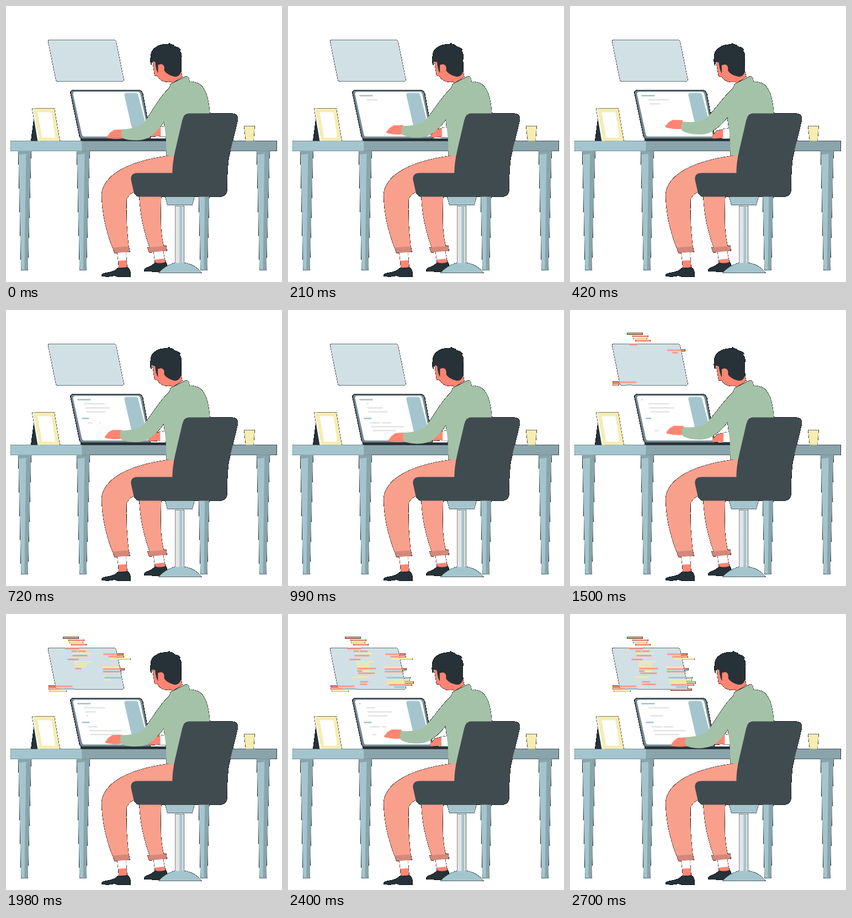
An HTML page for the animation above (2730 ms loop, 500 by 500 pixels).

```html
<!DOCTYPE html>
<html lang="en">
<head>
<meta charset="utf-8">
<title>Working at a desk</title>
<style>
html, body { margin: 0; width: 100%; height: 100%; overflow: hidden; background: #fff; }
svg { display: block; width: 100vw; height: 100vh; }
.blue { fill: #a4c5cd; } .steel { fill: #8aa4ab; } .dark { fill: #263238; }
.chair { fill: #404b50; } .skin { fill: #ff8573; } .pants { fill: #f9a08d; }
.cuff { fill: #d5877a; } .shirt { fill: #a4c2a8; } .cream { fill: #f5edb1; } .white { fill: #fff; }
</style>
</head>
<body>
<svg viewBox="0 0 500 500">
<defs>
  <!-- Blends the soft edge pixels with black, which leaves a fine dark rim -->
  <filter id="rim" filterUnits="userSpaceOnUse" x="0" y="0" width="500" height="500" color-interpolation-filters="sRGB">
    <feComponentTransfer in="SourceAlpha" result="mask"><feFuncA type="linear" slope="20"/></feComponentTransfer>
    <feMerge><feMergeNode in="mask"/><feMergeNode in="SourceGraphic"/></feMerge>
  </filter>
  <g id="leg">
    <path class="blue" d="M0 262H23L17 478H5Z"/>
    <path class="steel" d="M0 262H23L17 478H11L14 267L1 269Z"/>
  </g>
</defs>
<g filter="url(#rim)"><g transform="translate(.4 .4)">
  <path fill="#d1e0e5" d="M79 61H195Q198 61 199 64L213 133Q213 136 210 136H94Q91 136 90 133L76 64Q76 61 79 61Z"/>
  <g id="code"></g>

  <use href="#leg" x="22"/><use href="#leg" x="128"/>
  <use href="#leg" x="347"/><use href="#leg" x="454"/>
  <path class="steel" d="M8 244H490V262H8Z"/>
  <path class="blue" d="M8 244H137V262H8Z"/>

  <path class="dark" d="M52 190L45 244H58Z"/>
  <path class="white" d="M47 185H52L61 244H57Z"/>
  <path class="cream" d="M49 185H87L97 244H60Z"/>
  <path class="white" d="M57 192H82L89 238H65Z"/>
  <path class="cream" d="M431 217H450L448 244H434Z"/>

  <path fill="#72888f" stroke="#263238" stroke-width=".8" d="M121 152.5H240Q245 152.5 247 158L261 235Q262 240 258 240H139Q134 240 133 235L117 158Q116 152.5 121 152.5Z"/>
  <path class="white" d="M125 155H238Q242 155 243 159L258 232Q258 236 255 236H141Q138 236 137 232L121 159Q121 155 125 155Z"/>
  <path class="blue" d="M217 157H235Q238 157 239 161L255 222H231Q228 222 227 218L214 161Q214 157 217 157Z"/>
  <g id="page"></g>
  <path class="dark" d="M135 239.5H290V244H137Q134 244 135 239.5Z"/>

  <path class="pants" d="M241 340C242 380 251 412 260 438L286 437C279 410 279 380 281 340Z"/>
  <path class="white" d="M267 444L284 442L287 458L269 460Z"/>
  <path class="cuff" d="M256 437L290 434L291 443L259 446Z"/>
  <path class="skin" d="M269 459L287 457L289 466L270 468Z"/>
  <path class="dark" d="M250 480Q249 475 256 473Q265 470 270 464Q280 467 289 463Q293 470 290 477L276 481Z"/>

  <path class="blue" d="M288 345H341L337 360H292Z"/>
  <path fill="#e2e4e3" d="M306 362H322V467H306Z"/>
  <path class="blue" d="M314 362H319V467H314ZM276 483Q288 470 305 465H325Q343 469 354 483Z"/>

  <g id="farHand">
    <path class="white" d="M278 219L292 217V236H278Z"/>
    <path class="skin" d="M280 219L268 222L259 233L262 236L280 235Z"/>
  </g>
  <path class="shirt" d="M298 141L326 127Q331 126 332 137C357 136 366 155 369 195L340 271H290C291 240 287 222 285 203L290 160Z"/>
  <g id="head">
    <path class="skin" d="M265 98L267 112L269 126L274 126Q280 137 293 137H300L301 139L319 128L314 105L290 90Z"/>
    <path class="dark" d="M263 106Q260 101 262 91Q262 80 270 75Q279 68 293 69Q297 65 297 69Q304 69 305 73Q313 74 316 79Q313 80 315 82Q319 87 317 97V118Q313 130 303 127Q291 124 286 116L280 105L275 106V121Q271 115 270 101L264 99Z"/>
    <path class="skin" d="M276 112Q276 104 282 105Q288 107 286 117Q280 120 277 116Z"/>
  </g>
  <path class="pants" d="M304 270C250 275 177 295 173 341C173 375 182 410 193 438L222 437C218 400 217 372 218 350Q223 337 240 334L304 340Z"/>
  <path class="white" d="M201 445L217 444L218 461L203 462Z"/>
  <path class="cuff" d="M193 437L222 435L224 445L196 447Z"/>
  <path class="skin" d="M203 461L218 460L219 473L204 474Z"/>
  <path class="dark" d="M173 489Q172 484 181 483Q197 481 204 473Q211 476 219 472Q227 478 225 490H202L196 488Q188 491 173 489Z"/>
  <path class="chair" d="M331 194H408Q422 195 419 208L403 275Q400 300 400 333Q399 345 387 345H243Q234 345 231 336L226 314Q225 302 238 302H301Q301 283 306 262L319 206Q322 194 331 194Z"/>
  <path id="hand" class="skin" d="M213 223L195 224L188 229L182 237L184 239L193 240Q203 241 213 239Z"/>
  <path id="arm" class="shirt"/>
</g></g>
</svg>
<script>
const LOOP = 2730, SWING = 910;
const RED = '#f79c87', YELLOW = '#f3eaa5', BLUE = '#a4c3cc', GREY = '#e3e5e3';
const $ = id => document.getElementById(id);
const clamp = v => Math.max(0, Math.min(1, v));

function addBar(parent, x, y, height, fill) {
  const bar = document.createElementNS('http://www.w3.org/2000/svg', 'rect');
  for (const [k, v] of Object.entries({ x, y: y - height / 2, height, fill })) bar.setAttribute(k, v);
  return $(parent).appendChild(bar);
}

// x, y, width, colour, then times at which the line starts typing or erasing
const page = [
  [129, 162, 24, BLUE, 30, 1360, 1520, 2262, 2420],
  [141, 169.5, 38, GREY, 130, 860, 1050, 2316, 2470],
  [143, 177, 45, GREY, 357, 936, 1170, 1893, 2100, 2480],
  [145, 184, 35, GREY, 480, 1040, 1280, 1843, 2150, 2649],
  [137, 196, 14, BLUE, 580, 1150, 1395],
  [148, 204, 18, GREY, 650, 1200, 1700],
  [169, 204, 18, GREY, 700, 1250, 2325],
  [150, 211, 59, GREY, 780, 1300, 1750, 2150, 2450],
  [153, 218, 53, GREY, 871, 1372, 1750, 2270, 2575]
].map(([x, y, w, color, ...flips]) => ({ w, flips, el: addBar('page', x, y, 2.6, color) }));

// Each block types downwards: start time, ms per pixel of height, lines
const code = [
  [1165, 14, [
    [103, 42.5, 28, RED], [113, 47, 28, RED], [114, 51, 25, YELLOW], [118, 55, 27, RED],
    [107, 62.5, 25, RED], [118, 67, 10, RED], [130, 67, 14, RED], [120, 71, 32, YELLOW],
    [120, 75, 27, RED], [111, 82, 20, RED], [123, 86, 33, YELLOW], [123, 90, 25, YELLOW],
    [125, 94.5, 22, YELLOW], [125, 98.5, 34, RED], [125, 103, 9, RED], [136, 103, 12, YELLOW],
    [127, 107, 30, RED], [117, 114, 26, YELLOW], [130, 122.5, 15, RED], [130, 127, 25, RED]]],
  [1412, 11.7, [
    [176, 72.5, 36, RED], [185, 77, 28, RED], [188, 81, 37, YELLOW], [173, 96, 33, YELLOW],
    [175, 99.5, 39, RED], [175, 104, 33, RED], [178, 115, 43, BLUE], [178, 119, 42, YELLOW],
    [180, 123.5, 47, YELLOW], [183, 128, 41, RED], [192, 132, 19, BLUE]]],
  [2420, 0, [[182, 136.5, 38, RED]]],
  [1400, 12, [[77, 130.5, 43, RED], [77, 135, 23, RED], [102, 135, 21, BLUE], [79, 139, 30, YELLOW]]]
].flatMap(([start, rate, lines]) => lines.map(([x, y, w, color]) =>
  ({ w, start: start + rate * (y - lines[0][1]), el: addBar('code', x, y, 2.8, color) })));

const armDown = 'M297 147C275 165 258 205 245 215Q231 222 210 223Q206 231 211 239C226 245 250 244 261 236C275 226 284 213 288 204L310 170Z';
const armUp = 'M297 147C275 165 255 200 239 207Q225 211 204 209Q199 216 202 225C214 233 238 234 250 230C268 222 280 207 286 200L310 170Z';
const upValues = armUp.match(/\d+/g);

function mixArm(k) {
  let i = 0;
  return armDown.replace(/\d+/g, n => (+n + (upValues[i++] - n) * k).toFixed(2));
}

function typed(flips, t) {
  const last = flips.filter(f => f <= t).length - 1;
  if (last < 0) return 0;
  const p = clamp((t - flips[last]) / 150);
  return last % 2 ? 1 - p : p;
}

function draw(now) {
  const t = now % LOOP;
  const k = (1 - Math.cos(t / SWING * 2 * Math.PI)) / 2;
  $('arm').setAttribute('d', mixArm(k));
  $('hand').setAttribute('transform', `translate(${-10 * k} ${-17 * k}) rotate(${5 * k} 212 230)`);
  $('farHand').setAttribute('transform', `translate(${-3 * k} ${4 * k})`);
  $('head').setAttribute('transform', `rotate(${-1.5 * k} 308 132)`);
  for (const b of page) b.el.setAttribute('width', b.w * typed(b.flips, t));
  for (const b of code) b.el.setAttribute('width', b.w * clamp((t - b.start) / 100));
}

const begin = performance.now();
function tick() {
  draw(performance.now() - begin);
  requestAnimationFrame(tick);
}
tick();
</script>
</body>
</html>
```
